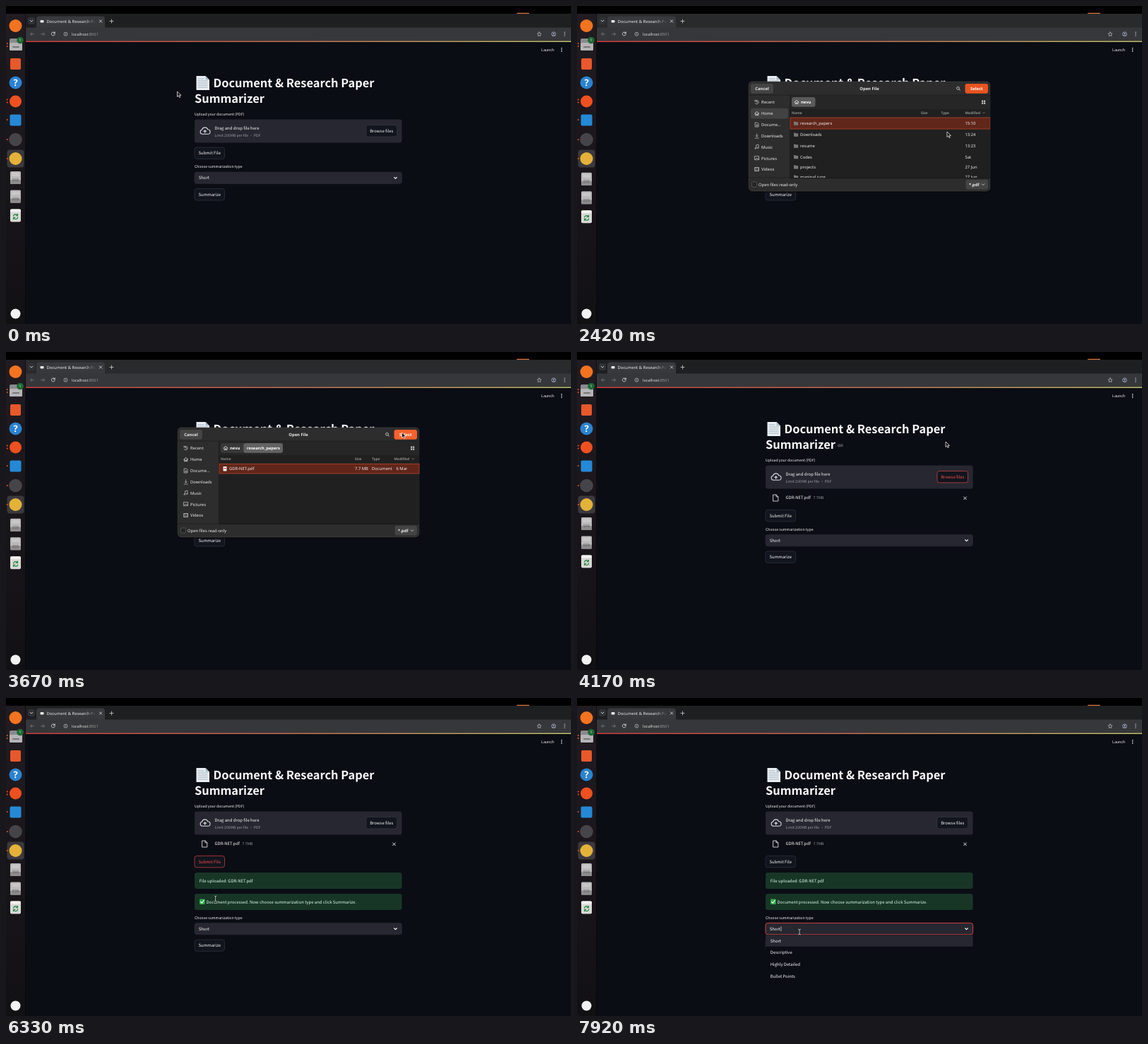
These frames come from a looping animation (800x450 px, 8000 ms). An HTML page:

```html
<!DOCTYPE html>
<html lang="en">
<head>
<meta charset="utf-8">
<title>Summarizer demo</title>
<style>
html, body { margin: 0; width: 100%; height: 100%; overflow: hidden; background: #000; }
svg { display: block; width: 100vw; height: 100vh; }
text { font-family: "Noto Sans CJK SC", "Noto Sans CJK JP", "Noto Sans", sans-serif; text-rendering: geometricPrecision; white-space: pre; }
.ui text { font-family: "Noto Sans", "Open Sans", sans-serif; }
.line { fill: none; stroke-linecap: round; stroke-linejoin: round; }
</style>
</head>
<body>
<svg id="stage" viewBox="0 0 800 450"></svg>
<script>
const LOOP = 8000, STEP = 1000 / 12;
const RED = '#ff4b4b', PAGE = '#0a0d14', PANEL = '#262730';

// x, y is the left (or anchored) end and the middle of the capitals
const text = (x, y, s, size = 5.95, fill = '#fafafa', more = '') =>
  `<text x="${x}" y="${y + size * .36}" font-size="${size}" fill="${fill}" ${more}>${s}</text>`;
const box = (x, y, w, h, r, fill, more = '') =>
  `<rect x="${x}" y="${y}" width="${w}" height="${h}" rx="${r}" fill="${fill}" ${more}/>`;
const dot = (x, y, r, fill, more = '') => `<circle cx="${x}" cy="${y}" r="${r}" fill="${fill}" ${more}/>`;
const line = (d, color = '#fafafa', w = .8, more = '') =>
  `<path class="line" d="${d}" stroke="${color}" stroke-width="${w}" ${more}/>`;
const group = (id, s, more = '') => `<g id="${id}" ${more}>${s}</g>`;
const mid = 'text-anchor="middle"', bold = 'font-weight="700"';
const chevron = (x, y, r, color, w) => line(`M${x - r} ${y - r / 2}l${r} ${r}l${r} ${-r}`, color, w);

const button = (id, x, y, w, s) => group(id,
  box(x, y - 8.2, w, 16.4, 3.2, '#11151d', 'stroke="#3a3c45" stroke-width=".6"') +
  text(x + w / 2, y, s, 5.95, '#fafafa', mid));

function dock() {
  const running = [[53], [57], [132.5], [136.5], [161], [189], [216]];
  const drive = y => box(6, y - 9, 15, 18, 1.5, '#b9b9b9') + box(6, y + 3, 15, 6, 1, '#8d8d8d') +
    text(13.5, y + 3.5, 'SSD', 5, '#6b6b6b', mid + bold) + box(8, y - 7, 11, 5, 1, '#c8c8c8');
  return `<g class="ui">` + box(0, 11, 27.5, 439, 0, 'url(#dockFill)') +
    dot(13.5, 28, 9, '#f5731f') +
    box(5, 46, 18, 17, 2, '#8a8a8c') + box(5, 52, 18, 11, 1.5, '#b5b4b6') + box(9, 57, 10, 2, 1, '#777') +
    dot(20, 48.5, 4.8, '#1c6b33') + text(20, 48.5, '1', 5, '#fff', mid) +
    box(6, 74, 15, 16, 2, '#e8582a') +
    dot(13.5, 108.5, 9, '#2a83d0') + text(13.5, 108.5, '?', 13, '#fff', mid + bold) +
    dot(13.5, 135, 8.5, '#f0501f') +
    box(5.5, 153.5, 16, 16, 2, '#2489d6') +
    dot(13.5, 189, 9.3, '#454448') +
    box(1.5, 203.5, 24, 25, 4, '#3b393d') + dot(13.5, 216, 9, '#e4b238') +
    running.map(([y]) => dot(1.8, y, 1, '#e95420')).join('') +
    group('drives', drive(243) + drive(269.5) +
      box(6, 287.5, 15, 18, 2, '#d9dad8') + box(6, 287.5, 15, 4, 1.5, '#f2f2f0') +
      line('M10.6 297a3 3 0 0 1 5.6 -.6M16.6 299a3 3 0 0 1 -5.8 .6M16.4 294.4v2.2h-2.2M10.6 301.6v-2.2h2.2', '#2c8a46', 1.3)) +
    dot(13.5, 435.5, 7, '#f2f2f2') + '</g>';
}

function browser() {
  return `<g class="ui">` + box(28, 11, 772, 39, 0, '#1e1f21') + group('dim', box(28, 11, 772, 20, 0, '#292a2c')) +
    box(31, 16, 10, 10, 3, '#313235') + chevron(36, 21.2, 1.8, '#d5d5d5', .9) +
    box(43, 14.5, 97, 20, 4, '#38393c') + box(28, 30.5, 772, 19, 0, '#36373a') +
    box(48.5, 20, 5, 3.4, 1, '#e8e8e8') +
    text(57.5, 21.5, 'Document &amp; Research Pa', 5.85, 'url(#tabFade)') +
    line('M132.3 19.8l3.4 3.4m0 -3.4l-3.4 3.4', '#e0e0e0', .8) +
    line('M147 21.5h5m-2.5 -2.5v5', '#d0d0d0', .8) +
    line('M39.5 39.7h-5m2.2 -2.2l-2.2 2.2l2.2 2.2M49.5 39.7h5m-2.2 -2.2l2.2 2.2l-2.2 2.2', '#77787a', .8) +
    line('M69 38.2a2.5 2.5 0 1 0 .2 2M69.2 36.8v1.8h-1.8', '#dcdcdc', .9) +
    dot(84.5, 39.7, 2.5, 'none', 'stroke="#c8c8c8" stroke-width=".7"') + line('M84.5 39.5v1.3m0 -2.5v.1', '#c8c8c8', .6) +
    text(93, 39.8, 'localhost<tspan fill="#97989b">:8501</tspan>', 5.55, '#dedede') +
    line('M755 36.8l.9 1.9l2.1 .3l-1.5 1.4l.4 2.1l-1.9 -1l-1.9 1l.4 -2.1l-1.5 -1.4l2.1 -.3z', '#d5d5d5', .6) +
    dot(775.5, 39.7, 2.9, 'none', 'stroke="#aab6d8" stroke-width=".8"') + dot(775.5, 38.9, 1, '#aab6d8') +
    line('M773.8 41.6q1.7 -1.4 3.4 0', '#aab6d8', .7) +
    [37.3, 39.7, 42.1].map(y => dot(791, y, .7, '#ddd')).join('') + '</g>';
}

function alertBox(id, y, s) {
  return group(id, box(267, y - 11.5, 293.5, 23, 3.2, '#183626') + s);
}

function page() {
  const menu = ['Short', 'Descriptive', 'Highly Detailed', 'Bullet Points'];
  return box(28, 50, 772, 400, 0, PAGE) + box(28, 49.6, 772, 1.2, 0, 'url(#rainbow)') +
    text(758, 62, 'Launch', 5.3) + [59.7, 62, 64.3].map(y => dot(786.7, y, .75, '#fafafa')).join('') +
    '<path d="M269.5 99h13l5.5 5.5v14.500h-18.500z" fill="#e9eef2"/><path d="M282.500 99l5.500 5.500h-5.500z" fill="#a9bccb"/>' +
    line('M272 103h8M272 106h13M272 109h13M272 112h13M272 115h13', '#8da3b2', .8) +
    text(293.5, 109, 'Document &amp; Research Paper', 16.4, '#fafafa', bold) +
    text(267, 131.2, 'Summarizer', 16.4, '#fafafa', bold) +
    group('link', line('M372.3 130.900h-1.300a1.400 1.400 0 0 0 0 2.800h1.300M373.700 130.900h1.300a1.400 1.400 0 0 1 0 2.800h-1.300M371.800 132.300h2.400', '#8b8d94', .7)) +
    text(267, 153, 'Upload your document (PDF)', 5.2) +
    box(267, 160.5, 293.5, 33, 3.3, PANEL) +
    line('M278 181.3a3.200 3.200 0 0 1 -.4 -6.300a4.200 4.200 0 0 1 8 -.3a3.300 3.300 0 0 1 .3 6.600zM281.700 179.500v-3.700m-1.700 1.700l1.700 -1.700l1.700 1.700', '#d8d9de', 1.1) +
    text(295.5, 172.6, 'Drag and drop file here') +
    text(295.5, 183, 'Limit 200MB per file • PDF', 5.2, '#9a9ca4') +
    button('browse', 510, 176.7, 43.5, 'Browse files') +
    group('file', line('M278 202h4l2.800 2.800v6.200h-6.800zM282 202v2.800h2.800', '#d8d9de', .9) +
      text(295.5, 206, 'GDR-NET.pdf') + text(334.5, 206.2, '7.7MB', 5.2, '#9a9ca4') +
      line('M547.600 204.900l3.800 3.800m0 -3.800l-3.800 3.800', '#fafafa', .9)) +
    button('submit', 267, 208.2, 42.500, 'Submit File') +
    alertBox('alert1', 258.5, text(273.7, 258.5, 'File uploaded: GDR-NET.pdf', 5.95, '#dffde9')) +
    alertBox('alert2', 288.5, box(274, 284.5, 7.6, 7.6, 1, '#2fae4a') + line('M275.700 288.500l1.600 1.700l2.900 -4', '#fff', 1.1) +
      text(283.5, 288.5, 'Document processed. Now choose summarization type and click Summarize.', 5.95, '#dffde9')) +
    group('lower', text(267, 227.6, 'Choose summarization type', 5.2) +
      box(267, 235, 293.5, 16.4, 3.2, PANEL, 'id="select" stroke-width=".8"') +
      text(272.700, 243.2, 'Short') + chevron(551.5, 243.300, 1.900, '#fafafa', 1.1) +
      button('sum', 267, 266.7, 42.5, 'Summarize') +
      group('menu', line('M289 240.200v6', '#fafafa', .6) + box(267, 252, 293.5, 67, 2, PAGE) + box(267, 252, 293.5, 16.300, 0, PANEL) +
        menu.map((s, i) => text(273.8, 260 + i * 16.7, s)).join('')));
}

const folder = y => `<path d="M307 ${y - 2.600}h2.200l.8 .8h3.200v4.600h-6.200z" fill="#777"/>`;
const house = (x, y) => line(`M${x - 3} ${y}l3 -2.800l3 2.800M${x - 2} ${y - .5}v3h1.400v-1.700h1.200v1.700h1.400v-3`, '#e4e4e4', .8);
const row = (y, h) => box(302, y, 283, h, 0, '#61261a', 'stroke="#c2452a" stroke-width=".7"');

function dialog() {
  const size = 5.85, ink = '#ececec', soft = '#8f8f8f';
  const places = ['Recent', 'Home', 'Docume…', 'Downloads', 'Music', 'Pictures', 'Videos'];
  const marks = [
    'M252.200 134.500a2.700 2.700 0 1 1 0 3M252 133v1.700h1.700M254.500 134.600v1.600h1.200', '',
    'M252.500 165h3l1.500 1.500v4.500h-4.500zM253.600 168h2.200m-2.200 1.400h2.200',
    'M254.700 180.800v4.200m-1.500 -1.500l1.500 1.500l1.500 -1.500M252.200 187h5',
    'M253.600 201.400v-4.600l3.400 -.7v4.600m-3.400 .7a.9 .9 0 1 1 -.9 -.9M257 200.700a.9 .9 0 1 1 -.9 -.9',
    'M251.800 212.600h5.800v5h-5.800zM252.300 217l1.700 -2l1.300 1.200l1 -.8l1 1.600',
    'M251.900 228.500h5.600v5h-5.600zM253.300 228.500v5m2.800 -5v5'];
  const files = [[166, 'research_papers', '15:10'], [182, 'Downloads', '13:24'], [198, 'resume', '13:23'],
    [213.5, 'Codes', 'Sat'], [227.800, 'projects', '27 Jun'], [242, 'manipal june', '27 Jun']];
  const head = (x, s) => text(x, 151.300, s, 4.9, soft, bold);
  return box(242, 107, 344, 157, 6, '#000', 'opacity=".45"') +
    box(243, 107, 342, 155, 5, '#2d2d2d', 'stroke="#484848" stroke-width=".5"') +
    box(301.500, 126, 283.5, 117, 0, '#202020') + box(301.500, 126, 283.5, 20, 0, '#262626') +
    line('M243 126h342M243 243h342M301.500 126v117', '#191919', .6) +
    box(246, 110, 32, 13.700, 3, '#444') + text(262, 116.8, 'Cancel', size, ink, mid + bold) +
    text(414, 116.8, 'Open File', size, ink, mid + bold) +
    dot(539.5, 116.3, 1.900, 'none', 'stroke="#ddd" stroke-width=".8"') + line('M541 117.800l1.500 1.500', '#ddd', .9) +
    box(549.5, 110, 32.500, 13.700, 3, '#e95420', 'id="pick"') + text(565.8, 116.8, 'Select', size, '#fff', mid + bold) +
    [[573, 133.500], [576, 133.500], [573, 136.500], [576, 136.500]].map(([x, y]) => box(x, y, 2.2, 2.2, .3, '#c9c9c9')).join('') +
    group('homeRow', box(246, 144.7, 53, 14.700, 3, '#424242')) +
    places.map((s, i) => text(261, 136.2 + i * 15.85, s, size, ink) + line(marks[i], '#c9c9c9', .7)).join('') + house(254.7, 152.2) +
    head(304, 'Name') + chevron(576, 151.300, 1.500, soft, .6) + head(549.5, 'Modified') + line('M302 157.500h283', '#2d2d2d', .5) +
    group('homeView', box(304, 129, 33.5, 13.700, 3, '#5a5a5a') + head(487, 'Size') + head(515.5, 'Type') + row(158, 16) +
      files.map(([y, s, d]) => folder(y) + text(316, y, s, size, ink) + text(549.5, y, d, size, ink)).join(''),
      'clip-path="url(#list)"') +
    group('paperView', box(304, 129, 88, 13.700, 3, '#383838') + box(336.500, 129, 55.500, 13.700, 3, '#626262') +
      text(341, 135.8, 'research_papers', 5.75, '#fff', bold) + head(494, 'Size') + head(518, 'Type') + row(158.3, 13.700) +
      box(307.5, 162, 5, 6.4, .6, '#eee') + box(308.500, 164, 3, 1.200, 0, '#d33') +
      text(316, 165.2, 'GDR-NET.pdf', size, ink) + text(494, 165.2, '7.7 MB', size, ink) +
      text(518, 165.2, 'Document', size, ink) + text(552.500, 165.2, '6 Mar', size, ink)) +
    house(311, 136) + text(317, 135.8, 'nevu', size, '#fff', bold) +
    box(301.500, 243.2, 283, 1, 0, '#191919') +
    box(247.5, 249, 7, 7, 1.500, '#242424', 'stroke="#666" stroke-width=".6"') + text(257, 252.6, 'Open files read-only', size, ink) +
    box(550.5, 245.700, 31.500, 13.700, 3, '#444') + text(555, 252.600, '*.pdf', size, ink, bold) + chevron(575, 252.700, 1.700, '#ddd', .8);
}

const stage = document.getElementById('stage');
stage.innerHTML = `<defs>
  <linearGradient id="rainbow"><stop stop-color="${RED}"/><stop offset=".5" stop-color="#f08a60"/><stop offset="1" stop-color="#e8ea80"/></linearGradient>
  <linearGradient id="dockFill" x2="0" y2="1"><stop stop-color="#211c22"/><stop offset="1" stop-color="#111013"/></linearGradient>
  <linearGradient id="tabFade" gradientUnits="userSpaceOnUse" x1="114" x2="127"><stop stop-color="#e6e6e6"/><stop offset="1" stop-color="#e6e6e6" stop-opacity="0"/></linearGradient>
  <clipPath id="list"><rect x="301" y="126" width="284" height="117"/></clipPath></defs>` +
  box(0, 0, 800, 450, 0, '#000') + box(723, 9.800, 18, 2, 1, '#d9743f') +
  browser() + page() + dock() + group('dialog', dialog(), 'class="ui"') +
  group('arrow', '<path d="M0 0v7.400l1.800 -1.600l1.200 2.700l1.300 -.6l-1.200 -2.600h2.400z" fill="#111" stroke="#fff" stroke-width=".7"/>') +
  group('beam', line('M-1.600 -4q1.600 0 1.600 1v6q0 1 -1.600 1M1.600 -4q-1.600 0 -1.600 1M1.600 4q-1.600 0 -1.600 -1', '#000', 1.7) +
    line('M-1.600 -4q1.600 0 1.600 1v6q0 1 -1.600 1M1.600 -4q-1.600 0 -1.600 1M1.600 4q-1.600 0 -1.600 -1', '#f4f4f4', .8));

const el = {};
stage.querySelectorAll('[id]').forEach(e => el[e.id] = e);
const show = (id, on) => el[id].setAttribute('visibility', on ? 'inherit' : 'hidden');
const move = (id, x, y) => el[id].setAttribute('transform', `translate(${x} ${y})`);

// time, x, y of the mouse
const path = [[0, 242.5, 121], [830, 293, 132], [1250, 380, 152], [1660, 352, 176], [2080, 531, 177],
  [2410, 524, 178], [2920, 372, 165], [3250, 368, 166], [3660, 560.5, 114], [3790, 560.5, 114], [3910, 545, 122],
  [4160, 545, 122], [4166, 522, 127], [4740, 288, 232], [5250, 288, 233], [5750, 260, 256], [6000, 312, 266],
  [6330, 294, 287], [6500, 302, 293], [6670, 302, 293], [7420, 314, 326], [7900, 315, 331], [8000, 315, 331]];
const beamTimes = [[1160, 1830], [6050, 6700], [7300, 8000]];

function mouse(t) {
  const i = Math.max(1, path.findIndex(k => k[0] >= t));
  const [a, x, y] = path[i - 1], [b, u, v] = path[i];
  const p = (t - a) / (b - a), e = p * p * (3 - 2 * p);
  return [x + (u - x) * e, y + (v - y) * e];
}

function paintButton(id, hot) {
  const [rect, label] = el[id].children;
  rect.setAttribute('stroke', hot ? RED : '#3a3c45');
  label.setAttribute('fill', hot ? RED : '#fafafa');
}

function draw(t) {
  const [x, y] = mouse(t);
  const over = (l, top, r, b) => x >= l && x <= r && y >= top && y <= b;
  const open = t >= 2160 && t < 3800, inFolder = t >= 3080;
  const uploaded = t >= 3910, sent = t >= 4990, done = t >= 5490, picked = t >= 7490;
  const drop = uploaded ? 23.4 : 0;

  show('dialog', open);
  show('dim', open);
  move('drives', 0, open ? 1.8 : 0);
  const grow = Math.min(1, .4 + (t - 2160) / 250);
  el.dialog.setAttribute('opacity', grow);
  el.dialog.setAttribute('transform', `translate(414 184.5) scale(${.85 + .15 * grow}) translate(-414 -184.5)`);
  show('homeRow', !inFolder);
  show('homeView', !inFolder);
  show('paperView', inFolder);
  el.pick.setAttribute('fill', over(549, 110, 582, 124) ? '#f8622c' : '#e95420');

  show('link', !open && over(267, 96, 560, 142));
  show('file', uploaded);
  show('alert1', sent);
  show('alert2', done);
  move('submit', 0, drop);
  move('lower', 0, drop + (sent ? 30 : 0) + (done ? 30 : 0));
  paintButton('browse', over(510, 168, 553, 185) || (t >= 2080 && t < 4700));
  paintButton('submit', over(267, 200 + drop, 309, 216 + drop) || (t >= 4700 && !picked));
  el.select.setAttribute('stroke', picked ? RED : PANEL);
  show('menu', picked);

  const beam = beamTimes.some(([a, b]) => t >= a && t < b);
  show('arrow', !beam);
  show('beam', beam);
  move('arrow', x, y);
  move('beam', x, y);
}

function tick(now) {
  const t = now % LOOP;
  draw(Math.floor(t / STEP + .01) * STEP);
  requestAnimationFrame(tick);
}
draw(0);
requestAnimationFrame(tick);
</script>
</body>
</html>
```
